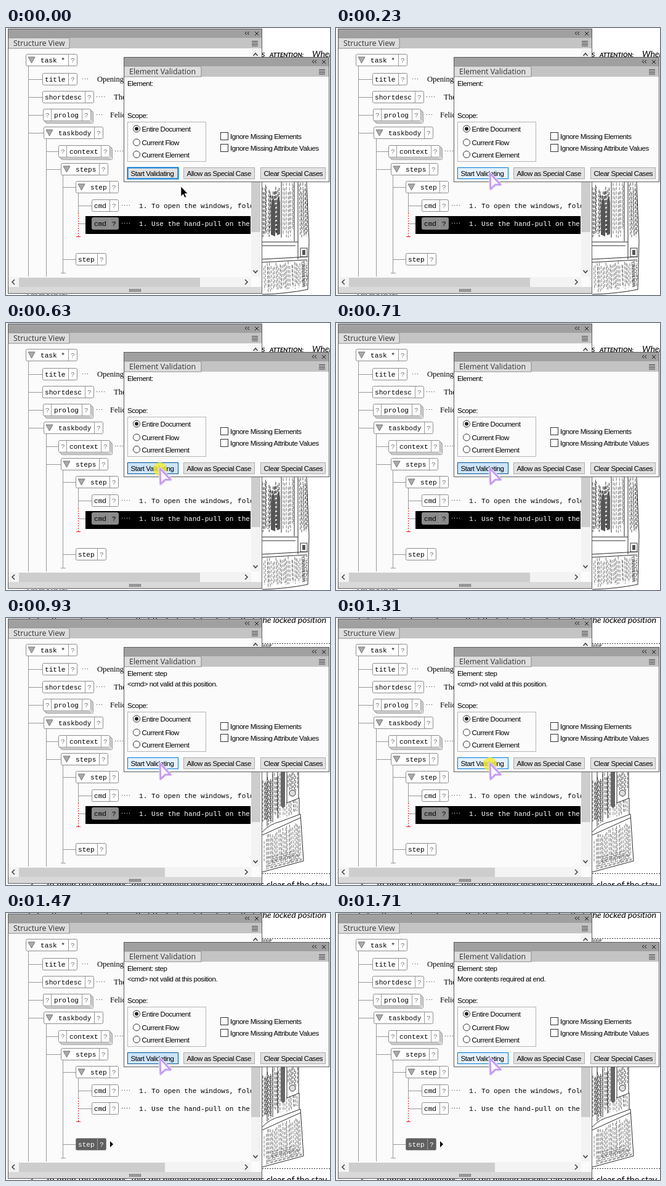
An HTML page for the animation above (2.01 s loop, 526 by 433 pixels).

```html
<!DOCTYPE html>
<html lang="en">
<head>
<meta charset="utf-8">
<title>Element validation</title>
<style>
html, body { margin: 0; width: 100%; height: 100%; overflow: hidden; background: #fff; }
svg { display: block; width: 100%; height: 100%; }
text { white-space: pre; }
.ui { font: 11.5px "Liberation Sans", Arial, sans-serif; letter-spacing: -.45px; }
.tab { font: 12.4px "Open Sans", sans-serif; fill: #333; }
.code { font: 11.11px "Liberation Mono", monospace; }
.serif { font: 12.5px "Liberation Serif", serif; }
.doc { font: 14.4px Lato, sans-serif; letter-spacing: -.12px; }
.doc-it { font: italic 14.2px Lato, sans-serif; letter-spacing: -.12px; }
.tree { fill: none; stroke: #999; }
.missing { fill: none; stroke: #e02020; }
.ink { fill: none; stroke: #2a2a2a; }
</style>
</head>
<body>
<svg id="stage" viewBox="0 0 526 433" preserveAspectRatio="none"></svg>
<script>
const LOOP = 2010;
const CHAR = 6.67;

const rect = (x, y, w, h, fill, stroke = 'none', extra = '') =>
  `<rect x="${x}" y="${y}" width="${w}" height="${h}" fill="${fill}" stroke="${stroke}" ${extra}/>`;
const path = (d, attrs) => `<path d="${d}" ${attrs}/>`;
const text = (x, y, s, cls = 'ui', attrs = '') =>
  `<text x="${x}" y="${y}" class="${cls}" ${attrs}>${s.replace(/</g, '&lt;')}</text>`;
const group = (id, body, attrs = '') => `<g id="${id}" ${attrs}>${body}</g>`;

function random(seed) {
  return () => (seed = (seed * 16807) % 2147483647) / 2147483647;
}

// Rough pen strokes running from the edge a-b to the edge c-d.
function hatch([ax, ay, bx, by], [cx, cy, dx, dy], count, seed, color = '#555') {
  const rnd = random(seed);
  let d = '';
  for (let i = 0; i < count; i++) {
    const k = (i + rnd() * .7) / count;
    const s = rnd() * .2, e = 1 - rnd() * .2;
    const x0 = ax + (bx - ax) * k, y0 = ay + (by - ay) * k;
    const x1 = cx + (dx - cx) * k, y1 = cy + (dy - cy) * k;
    const at = f => `${(x0 + (x1 - x0) * f).toFixed(1)} ${(y0 + (y1 - y0) * f).toFixed(1)}`;
    d += `M${at(s)}L${at(e)}`;
  }
  return path(d, `fill="none" stroke="${color}" stroke-dasharray="5 2"`);
}

function firstPage() {
  return text(415, 47, 's', 'doc-it', 'font-weight="bold"') +
    text(428, 47, 'ATTENTION:', 'doc-it', 'style="font-size:10px;font-weight:bold;letter-spacing:0"') +
    text(497, 47, 'When', 'doc-it') +
    hatch([417, 250, 424, 250], [417, 345, 424, 345], 5, 11) +
    hatch([427, 262, 444, 252], [425, 340, 446, 335], 13, 23, '#333') +
    hatch([450, 250, 468, 250], [450, 342, 468, 342], 8, 31, '#777') +
    hatch([476, 250, 489, 250], [478, 345, 491, 345], 8, 47) +
    hatch([418, 381, 488, 376], [420, 430, 489, 422], 30, 59, '#777') +
    hatch([480, 380, 480, 422], [490, 378, 490, 420], 18, 61) +
    path('M447 250V340M468 250V346M474 250V375M416 347H474M416 353H470M416 375L490 371M416 380L489 376M488 250L492 345L490 424Q455 431 416 432', 'class="ink"') +
    path('M430 335V290Q434 262 437 290V338ZM440 336V280Q443 266 445 284V334Z', 'fill="#555"') +
    rect(478, 357, 11, 14, '#fff', '#333') + rect(481, 360, 5, 8, '#555') +
    hatch([34, 432, 100, 432], [38, 433, 104, 433], 16, 71);
}

function secondPage() {
  return text(36, 8, 'below the window and ensure that the locking tab indicates that', 'doc-it') +
    text(411.5, 8, 'the locked position', 'doc-it') +
    path('M416 41.5H526M416 414.5H526', 'stroke="#333" stroke-dasharray="2 2"') +
    hatch([416, 42, 434, 42], [416, 47, 430, 47], 9, 5) +
    hatch([417, 250, 432, 250], [417, 346, 432, 332], 9, 13, '#333') +
    hatch([433, 250, 446, 250], [433, 330, 446, 324], 7, 17, '#666') +
    hatch([458, 250, 474, 250], [458, 282, 474, 282], 8, 29) +
    hatch([450, 300, 474, 292], [450, 324, 476, 316], 10, 31, '#777') +
    hatch([419, 352, 478, 325], [419, 408, 481, 392], 26, 37, '#777') +
    hatch([420, 390, 420, 410], [482, 374, 482, 394], 8, 41, '#777') +
    path('M424 250V338M433 250V331M441 250V325M456 250V300M475 250V292M416 347Q428 334 446 330L478 318M416 352L478 324M478 318L483 394L416 412M456 300L476 292V318', 'class="ink"') +
    `<circle cx="465" cy="284" r="5" fill="#ddd" stroke="#333"/>` +
    path('M446 250V304Q450 312 453 304V250Z', 'fill="#666"') +
    text(37, 438, '7.', 'doc') +
    text(64, 438, 'To open the windows, fold the hinged locking tab inwards clear of the stay', 'doc');
}

// Floating panel: grey strip, tab row, then the body.
function panel(x, y, w, h, title, tabWidth) {
  const r = x + w;
  return rect(x + .5, y + .5, w - 1, h - 1, '#fbfbfb', '#5c5c5c') +
    rect(x + 1, y + 1, w - 2, 14, '#a0a0a0') +
    rect(x + 1, y + 15, w - 2, 17, '#c4c4c4') +
    path(`M${x + 1} ${y + 32}V${y + 15}H${x + tabWidth - 2}L${x + tabWidth} ${y + 17}V${y + 32}Z`, 'fill="#dedede" stroke="#8a8a8a"') +
    text(x + 9, y + 28, title, 'tab') +
    path(`M${r - 25} ${y + 5}l-3 2.5l3 2.5m4-5l-3 2.5l3 2.5M${r - 12} ${y + 5}l6 6m0-6l-6 6`, 'fill="none" stroke="#1c1c1c"') +
    path(`M${r - 17} ${y + 20.5}h10m-10 2.5h10m-10 2.5h10m-10 2.5h10`, 'stroke="#444"');
}

// One element of the tree; kind is '', 'open' (triangle) or 'stack' (collapsed).
function tag(x, y, label, kind = '', id = '') {
  const tx = x + (kind === 'open' ? 24 : kind === 'stack' ? 18 : 4);
  const div = Math.round(tx + label.length * CHAR + 4.5);
  const w = div + 14 - x;
  const box = (o, a = '') => rect(x + o + .5, y - 9.5 + o, w, 19, '#fff', '#8c8c8c', 'rx="2" ' + a);
  const mark = qx => text(qx, y + 4, '?', 'code', 'fill="#777" data-mark');
  let s = kind === 'stack' ? box(4) + box(2) : '';
  s += box(0, 'data-box');
  if (kind === 'open') s += path(`M${x + 4} ${y - 5}h11l-5.5 10z`, 'fill="#aaa" stroke="#777"');
  if (kind === 'stack') s += mark(x + 4) + path(`M${x + 13.5} ${y - 9}v18`, 'class="tree"');
  s += path(`M${div + .5} ${y - 9}v18`, 'class="tree"') + mark(div + 4);
  s += text(tx, y + 4, label, 'code', 'data-label');
  return `<g ${id && `id="${id}"`}>${s}</g>`;
}

function dots(x, y, n = 4) {
  return path(`M${x} ${y - .5}h${n * 4 - 3}`, 'stroke="#333" stroke-dasharray="1 3"');
}

function structureView() {
  return panel(3, 1, 413, 430, 'Structure View', 100) +
    rect(398, 34, 15, 369, '#f3f3f3') +
    path('M401.5 45l3.5-4l3.5 4M401.5 393l3.5 4l3.5-4', 'fill="none" stroke="#444" stroke-width="1.6"') +
    rect(4, 404, 394, 16, '#f3f3f3') + rect(21, 405, 294, 15, '#cdcdcd', 'none', 'id="thumb"') +
    path('M14 408l-4 4l4 4M388 408l4 4l-4 4', 'fill="none" stroke="#444" stroke-width="1.6"') +
    rect(4, 420, 411, 10, '#d9d9d9') +
    path('M200 425.5h19', 'stroke="#555" stroke-width="5" stroke-dasharray="1 1"') +
    path('M36.5 62V403M36 83.5H59M36 112.5H59M36 141.5H60M36 170.5H61M65.5 180V403M65 200.5H85M65 229.5H89M92.5 239V397M89 397.5H97M92 258.5H113M92 375.5H113M117.5 268V300M117 288.5H139M117 317.5H139', 'class="tree"') +
    path('M117.5 300V339', 'class="missing" stroke-dasharray="2 2"') +
    path('M114 338.5H121', 'class="missing"') +
    group('row', rect(129, 305, 268, 29, '#000')) +
    tag(32, 52, 'task *', 'open') + tag(59, 83, 'title') + tag(59, 112, 'shortdesc') +
    tag(60, 141, 'prolog', 'stack') + tag(61, 170, 'taskbody', 'open') +
    tag(85, 200, 'context', 'stack') + tag(89, 229, 'steps', 'open') +
    tag(113, 258, 'step', 'open') + tag(139, 288, 'cmd') +
    tag(139, 317, 'cmd', '', 'cmd') + tag(113, 375, 'step', '', 'step') +
    dots(124, 83, 3) + dots(147, 112) + dots(147, 141, 3) + dots(177, 200) + dots(188, 288) +
    group('rowText', dots(188, 317) + text(216, 321, '1. Use the hand-pull on the', 'code')) +
    text(148, 87, 'Opening', 'serif') + text(175, 116, 'The', 'serif') + text(169, 145, 'Felic', 'serif') +
    text(216, 292, '1. To open the windows, fold', 'code') +
    rect(398, 250, 15, 81, '#cdcdcd') + rect(413, 250, 2, 154, '#fbfbfb') +
    path('M415.5 250V430', 'stroke="#5c5c5c"') +
    path('M169 370l5 5l-5 5z', 'id="caret"');
}

function validation() {
  const radio = (y, label) =>
    `<circle cx="212" cy="${y}" r="5.5" fill="#fff" stroke="#333"/>` + text(220.5, y + 4.5, label);
  const check = (y, label) => rect(348.5, y - 6, 12, 12, '#fff', '#333') + text(364, y + 4.5, label);
  const button = (x, w, label, attrs = '') =>
    rect(x + .5, 226.5, w - 1, 18, '#e1e1e1', '#adadad', attrs) + text(x + 5.5, 240, label);
  return panel(191, 47, 334, 203, 'Element Validation', 126) +
    text(197, 94, 'Element:', 'ui', 'id="element"') + text(197, 111, '', 'ui', 'id="message"') +
    text(197, 146, 'Scope:') + rect(197.5, 152.5, 127, 64, 'none', '#b5b5b5') +
    radio(163.5, 'Entire Document') + '<circle cx="212" cy="163.5" r="3" fill="#222"/>' +
    radio(185.5, 'Current Flow') + radio(205, 'Current Element') +
    check(175.5, 'Ignore Missing Elements') + check(194.5, 'Ignore Missing Attribute Values') +
    button(197, 83, 'Start Validating', 'id="start"') +
    button(288, 116, 'Allow as Special Case') + button(413, 106, 'Clear Special Cases');
}

const POINTER = 'M0 0L17 18L8.5 18L1 25Z';

document.getElementById('stage').innerHTML =
  rect(0, 0, 526, 433, '#fff') + group('page0', firstPage()) + group('page1', secondPage()) +
  structureView() + validation() +
  '<circle id="click" cx="250" cy="237" fill="#f3ec2e" opacity=".8"/>' +
  group('arrow', path('M0 0V16L3.6 12.6L6.2 18L8.6 17L6 11.6H11Z', 'stroke="#fff" stroke-width=".6"')) +
  group('pointer', path(POINTER, 'fill="#fff" stroke="#e6d8fa" stroke-width="5" stroke-linejoin="round"') +
    path(POINTER, 'fill="#fbf7ff" stroke="#c39af0" stroke-width="2.6" stroke-linejoin="round"'));

const $ = id => document.getElementById(id);
const show = (id, on) => $(id).setAttribute('visibility', on ? 'visible' : 'hidden');
const set = (node, attrs) => Object.entries(attrs).forEach(([k, v]) => node.setAttribute(k, v));

const BUTTON = {
  focus: { fill: '#e1e1e1', stroke: '#0078d7', 'stroke-width': 2 },
  hover: { fill: '#e5f1fb', stroke: '#0078d7', 'stroke-width': 1 },
  press: { fill: '#cce4f7', stroke: '#005499', 'stroke-width': 1 }
};
const MESSAGES = [
  ['Element:', ''],
  ['Element: step', '<cmd> not valid at this position.'],
  ['Element: step', 'More contents required at end.']
];

// Each step changes only what it names; the rest carries over.
const STEPS = [
  [0, { x: 284, y: 257, cursor: 'arrow', button: 'focus', click: 0, page: 0, message: 0, selected: 'row' }],
  [80, { x: 271, y: 249 }],
  [150, { x: 254, y: 238, cursor: 'pointer', button: 'hover' }],
  [230, { x: 250, y: 236 }],
  [540, { click: 10 }],
  [630, { click: 11, button: 'press' }],
  [710, { click: 0 }],
  [780, { page: 1 }],
  [850, { message: 1 }],
  [930, { button: 'hover' }],
  [1230, { click: 10 }],
  [1310, { click: 11 }],
  [1390, { click: 0, button: 'press', selected: 'cmd' }],
  [1470, { selected: 'step' }],
  [1550, { message: 2 }],
  [1710, { button: 'hover' }]
];

function paintTag(id, fill, ink, mark) {
  const node = $(id);
  node.querySelector('[data-box]').setAttribute('fill', fill);
  node.querySelector('[data-label]').setAttribute('fill', ink);
  node.querySelector('[data-mark]').setAttribute('fill', mark);
}

function draw(s) {
  show('page0', s.page === 0);
  show('page1', s.page === 1);
  $('thumb').setAttribute('width', s.page ? 237 : 294);
  show('arrow', s.cursor === 'arrow');
  show('pointer', s.cursor === 'pointer');
  $(s.cursor).setAttribute('transform', `translate(${s.x} ${s.y})`);
  $('click').setAttribute('r', s.click);
  set($('start'), BUTTON[s.button]);
  [$('element').textContent, $('message').textContent] = MESSAGES[s.message];

  const row = s.selected === 'row';
  show('row', row);
  show('caret', !row);
  const rowInk = row ? '#fff' : '#000';
  $('rowText').setAttribute('fill', rowInk);
  $('rowText').querySelector('path').setAttribute('stroke', rowInk);
  for (const id of ['cmd', 'step']) {
    if (s.selected === id) paintTag(id, '#5f5f5f', '#fff', '#fff');
    else if (row && id === 'cmd') paintTag(id, '#8a8a8a', '#000', '#000');
    else paintTag(id, '#fff', '#000', '#777');
  }
}

let start = null, shown = -1;
function tick(now) {
  if (start === null) start = now;
  const t = (now - start) % LOOP;
  const active = STEPS.filter(([at]) => at <= t);
  if (active.length !== shown) {
    shown = active.length;
    draw(Object.assign({}, ...active.map(([, change]) => change)));
  }
  requestAnimationFrame(tick);
}
draw(STEPS[0][1]);
requestAnimationFrame(tick);
</script>
</body>
</html>
```
